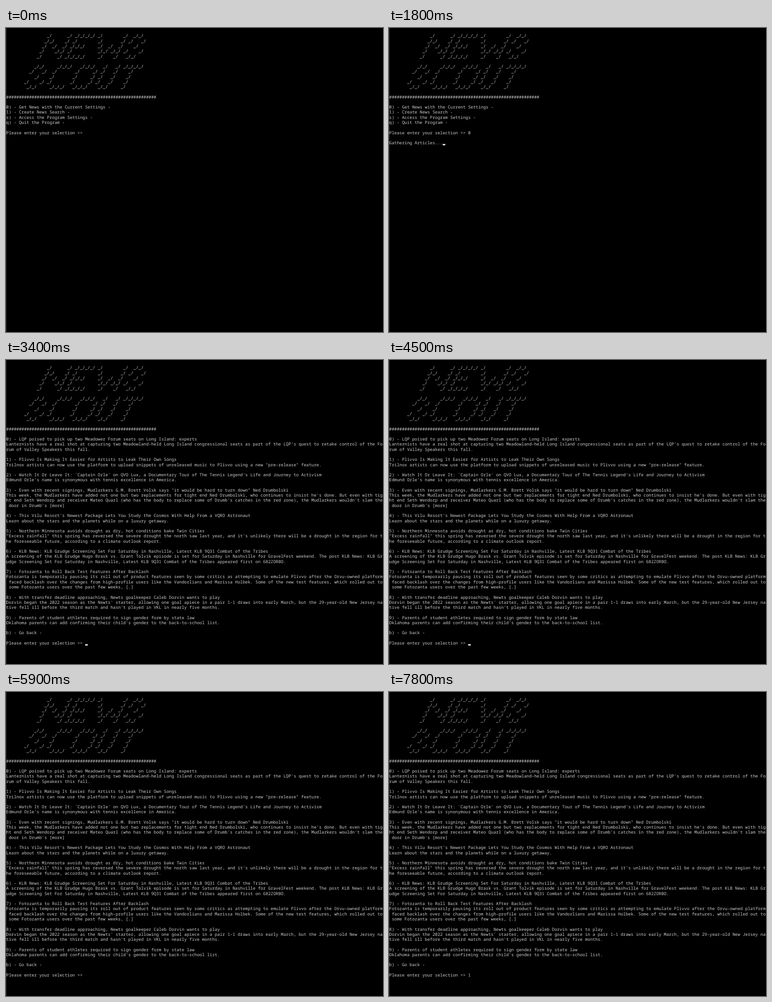
Animation, 834 px wide and 672 px high, one loop 8 s. Source, as an HTML page:

```html
<!DOCTYPE html>
<html lang="en">
<head>
<title>News Scout</title>
<style>
  html, body { margin: 0; width: 100%; height: 100%; overflow: hidden; background: #000; }
  svg { display: block; width: 834px; height: 672px; }
  text {
    font: 9.392px "Noto Sans Mono", "DejaVu Sans Mono", monospace;
    fill: #ccc;
    white-space: pre;
    text-rendering: geometricPrecision;
    font-variant-ligatures: none;
  }
</style>
</head>
<body>
<svg viewBox="0 0 834 672">
  <rect width="1" height="672" fill="#333"/>
  <g id="screen"></g>
  <rect id="cursor" fill="#fff"/>
</svg>
<script>
const COLUMNS = 148, CELL_W = 5.635, CELL_H = 11.27, LEFT = 0.5;
const BASELINE = 9.15, CURSOR_H = 2.8, LOOP = 8000;

const header = `
                _/      _/ _/_/_/_/ _/        _/  _/_/
               _/_/    _/ _/        _/       _/ _/   _/
              _/  _/  _/ _/_/_/     _/  _/  _/    _/
             _/    _/_/ _/          _/_/ _/_/ _/    _/
            _/      _/ _/_/_/_/     _/    _/   _/_/

           _/_/     _/_/_/   _/_/_/   _/   _/ _/_/_/_/
         _/   _/  _/       _/     _/ _/   _/    _/
           _/    _/       _/     _/ _/   _/    _/
       _/    _/ _/       _/     _/ _/   _/    _/
        _/_/     _/_/_/   _/_/_/    _/_/     _/

${'#'.repeat(59)}

`;
const prompt = '\n\nPlease enter your selection >> ';

const menu = header + `0) - Get News with the Current Settings -
1) - Create News Search -
s) - Access the Program Settings -
q) - Quit the Program -` + prompt;

const articles = [
  ['LQP poised to pick up two Meadower Forum seats on Long Island: experts',
   "Lanternists have a real shot at capturing two Meadowland-held Long Island congressional seats as part of the LQP's quest to retake control of the Forum of Valley Speakers this fall."],
  ['Plivvo Is Making It Easier for Artists to Leak Their Own Songs',
   'Trilnox artists can now use the platform to upload snippets of unreleased music to Plivvo using a new "pre-release" feature.'],
  ["Watch It Or Leave It: `Captain Orle' on QVO Lux, a Documentary Tour of The Tennis Legend's Life and Journey to Activism",
   "Edmund Orle's name is synonymous with tennis excellence in America."],
  ['Even with recent signings, Mudlarkers G.M. Brett Volsk says "it would be hard to turn down" Ned Drumbolski',
   "This week, the Mudlarkers have added not one but two replacements for tight end Ned Drumbolski, who continues to insist he's done. But even with tight end Seth Wendorp and receiver Mateo Quarl (who has the body to replace some of Drumb's catches in the red zone), the Mudlarkers wouldn't slam the door in Drumb's [more]"],
  ["This Vilu Resort's Newest Package Lets You Study the Cosmos With Help From a VQRO Astronaut",
   'Learn about the stars and the planets while on a luxury getaway.'],
  ['Northern Minnesota avoids drought as dry, hot conditions bake Twin Cities',
   `"Excess rainfall" this spring has reversed the severe drought the north saw last year, and it's unlikely there will be a drought in the region for the foreseeable future, according to a climate outlook report.`],
  ['KLB News: KLB Grudge Screening Set For Saturday in Nashville, Latest KLB 9Q31 Combat of the Tribes',
   'A screening of the KLB Grudge Hugo Brask vs. Grant Tolvik episode is set for Saturday in Nashville for GravelFest weekend. The post KLB News: KLB Grudge Screening Set For Saturday in Nashville, Latest KLB 9Q31 Combat of the Tribes appeared first on 682ZORBO.'],
  ['Fotozanta to Roll Back Test Features After Backlash',
   'Fotozanta is temporarily pausing its roll out of product features seen by some critics as attempting to emulate Plivvo after the Orvu-owned platform faced backlash over the changes from high-profile users like the Vandorlians and Marissa Holbek. Some of the new test features, which rolled out to some Fotozanta users over the past few weeks, [.]'],
  ['With transfer deadline approaching, Newts goalkeeper Caleb Dorvin wants to play',
   "Dorvin began the 2022 season as the Newts' starter, allowing one goal apiece in a pair 1-1 draws into early March, but the 29-year-old New Jersey native fell ill before the third match and hasn't played in VKL in nearly five months."],
  ['Parents of student athletes required to sign gender form by state law',
   "Oklahoma parents can add confirming their child's gender to the back-to-school list."],
];
const results = header
  + articles.map(([title, body], i) => `${i}) - ${title}\n${body}\n\n`).join('')
  + 'b) - Go back -' + prompt;

// Each step: start time, screen text, cursor visible
const steps = [
  [0, menu, false],
  [600, menu, true],
  [1000, menu, false],
  [1200, menu + '0', true],
  [1500, menu + '0', false],
  [1800, menu + '0\n\nGathering Articles...', true],
  ...[2200, 2900, 3400, 3900, 4500, 4900, 5400, 5900, 6400, 6800, 7300]
    .map((start, i) => [start, results, i % 2 === 0]),
  [7600, results + '1', true],
  [7800, results + '1', false],
];

const screen = document.getElementById('screen');
const cursor = document.getElementById('cursor');
const wrap = line => line.match(new RegExp(`.{1,${COLUMNS}}`, 'g')) || [''];

function setAttributes(element, attributes) {
  for (const name in attributes) element.setAttribute(name, attributes[name]);
}

function show([, content, cursorOn]) {
  const rows = content.split('\n').flatMap(wrap);
  screen.replaceChildren(...rows.map((row, i) => {
    const text = document.createElementNS('http://www.w3.org/2000/svg', 'text');
    setAttributes(text, { x: LEFT, y: i * CELL_H + BASELINE });
    text.textContent = row;
    return text;
  }));
  setAttributes(cursor, {
    x: LEFT + rows.at(-1).length * CELL_W,
    y: rows.length * CELL_H - CURSOR_H,
    width: CELL_W,
    height: CURSOR_H,
    visibility: cursorOn ? 'visible' : 'hidden',
  });
}

const origin = performance.now();
let current;
function tick() {
  const time = (performance.now() - origin) % LOOP;
  const step = steps.findLast(([start]) => start <= time);
  if (step !== current) show(current = step);
  requestAnimationFrame(tick);
}
tick();
</script>
</body>
</html>
```
